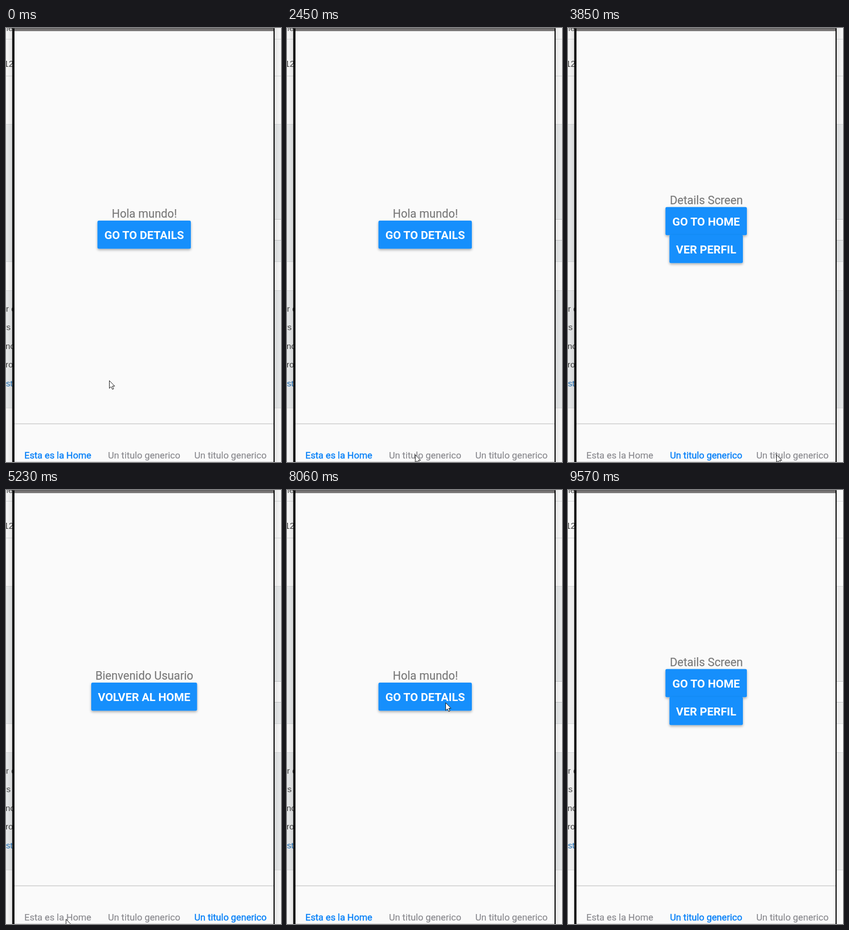
Animation, 552 px wide and 872 px high, one loop 9670 ms. Source, as an HTML page:

```html
<!DOCTYPE html>
<html lang="es">
<head>
<meta charset="utf-8">
<title>Tab navigation</title>
<style>
  html, body { margin: 0; width: 100%; height: 100%; overflow: hidden; background: #fafafa; }
  svg { display: block; width: 552px; height: 872px; }
  text { font-family: Roboto, sans-serif; }
  .page text { font: 17px "Liberation Sans", Arial, sans-serif; fill: #444; }
  .page .link { fill: #1d6fb8; }
  .app { filter: blur(.45px); }
  .app text { text-anchor: middle; }
  .label { font-size: 23px; fill: #7c7c7c; stroke: #7c7c7c; stroke-width: .25; }
  .button text { font-size: 22.7px; font-weight: 700; fill: #fff; }
  .tab { font-size: 18.6px; fill: #8a8a8f; stroke: #8a8a8f; stroke-width: .2; }
  .tab.active { fill: #0a82f8; stroke: #0a82f8; stroke-width: .5; }
</style>
</head>
<body>
<svg viewBox="0 0 552 872">
  <defs>
    <linearGradient id="shadeLeft"><stop offset="0" stop-opacity=".02"/><stop offset="1" stop-opacity=".1"/></linearGradient>
    <linearGradient id="shadeRight"><stop offset="0" stop-opacity=".1"/><stop offset="1" stop-opacity=".02"/></linearGradient>
    <filter id="drop" x="-10%" y="-20%" width="120%" height="150%">
      <feDropShadow dx="0" dy="2.5" stdDeviation="2.4" flood-opacity=".32"/>
    </filter>
  </defs>
  <g class="page">
    <rect width="552" height="872" fill="#fdfdfd"/>
    <g id="bands">
      <rect y="194" width="552" height="275"/>
      <rect y="528" width="552" height="235"/>
    </g>
    <path d="M0 22.5H552M0 96.5H552M0 193.5H552M0 469.5H552M0 527.5H552M0 763.5H552" stroke="#d9dbdc"/>
    <rect x="530" y="384.5" width="30" height="42" fill="#fdfdfd" stroke="#c4c6c8"/>
    <text x="-5" y="6">ne</text>
    <text x="-4" y="78">12</text>
    <text x="0" y="570">r c</text>
    <text x="-5" y="607">rs</text>
    <text x="-1" y="645">nc</text>
    <text x="-1" y="682">ro</text>
    <text x="0" y="719.5" class="link">st</text>
    <g id="shade">
      <rect width="13" height="872" fill="url(#shadeLeft)"/>
      <rect x="539" width="13" height="872" fill="url(#shadeRight)"/>
    </g>
  </g>
  <rect x="12.5" width="526.7" height="872" fill="#000"/>
  <rect x="17" width="520" height="872" fill="#fafafa"/>
  <rect x="13" width="526" height="1" fill="#555"/>
  <rect x="17" y="1" width="520" height="5" fill="#757272"/>
  <rect x="17" y="6" width="520" height="1" fill="#d5d5d5"/>
  <rect x="17" y="794.5" width="520" height="1.6" fill="#cdcdcd"/>
  <rect x="17" y="871" width="520" height="1" fill="#d0d0d0"/>
  <g class="app" id="screens"></g>
  <g class="app" id="tabs"></g>
  <path id="cursor" d="M.5 .5V16L4 12.7L6.6 18L9 17L6.6 11.6H11.2Z" fill="#fff" stroke="#111"/>
</svg>
<script>
const LOOP = 9670;
const POINTER_GONE = 9570;
const STEP = 136.6;
const CENTER = 277.3;
const $ = id => document.getElementById(id);

function add(parent, name, attrs, text = "") {
  const node = document.createElementNS("http://www.w3.org/2000/svg", name);
  for (const key in attrs) node.setAttribute(key, attrs[key]);
  node.textContent = text;
  return parent.appendChild(node);
}

function addButton(parent, text, top, width) {
  const group = add(parent, "g", { class: "button" });
  add(group, "rect", {
    x: CENTER - width / 2, y: top, width, height: 56.5, rx: 3,
    fill: "#178ffc", filter: "url(#drop)"
  });
  add(group, "text", { x: CENTER, y: top + 37.2 }, text);
}

function addScreen(label, baseline, buttons) {
  const group = add($("screens"), "g", {});
  add(group, "text", { class: "label", x: CENTER + .4, y: baseline }, label);
  buttons.forEach(([text, width], i) => addButton(group, text, baseline + 6 + i * 56, width));
  return group;
}

const screens = [
  addScreen("Hola mundo!", 381, [["GO TO DETAILS", 187.5]]),
  addScreen("Details Screen", 353.7, [["GO TO HOME", 163.5], ["VER PERFIL", 147.5]]),
  addScreen("Bienvenido Usuario", 381, [["VOLVER AL HOME", 212.5]])
];

const tabs = ["Esta es la Home", "Un titulo generico", "Un titulo generico"].map((text, i) =>
  add($("tabs"), "text", { class: "tab", x: 104 + i * 173.3, y: 865 }, text));

const visits = [
  { start: 0, screen: 0 },
  { start: 2600, screen: 1 },
  { start: 4530, screen: 2 },
  { start: 6580, screen: 0 },
  { start: 8210, screen: 1 }
];

// Each stroke bends from the previous end towards `via` and stops at `to`.
const origin = [207, 708];
const strokes = [
  { start: 120, steps: 1, via: origin, to: [200, 708] },
  { start: 510, steps: 8, via: [62, 850], to: [120, 853] },
  { start: 1610, steps: 4, via: [190, 868], to: [254, 856] },
  { start: 2450, steps: 1, via: [254, 856], to: [257, 857] },
  { start: 3030, steps: 7, via: [235, 836], to: [418, 857] },
  { start: 4810, steps: 4, via: [270, 860], to: [120, 862] },
  { start: 6860, steps: 7, via: [540, 430], to: [318, 427] },
  { start: 8620, steps: 4, via: [420, 700], to: [489, 849] }
];

const smooth = u => u * u * (3 - 2 * u);
const bend = (a, b, c, u) => (1 - u) ** 2 * a + 2 * u * (1 - u) * b + u * u * c;

function pointerAt(t) {
  let point = origin;
  for (const { start, steps, via, to } of strokes) {
    if (t < start) break;
    const taken = Math.min(steps, Math.floor((t - start) / STEP) + 1);
    const u = smooth(taken / steps);
    point = point.map((from, axis) => bend(from, via[axis], to[axis], u));
  }
  return point.map(Math.round);
}

function render(t) {
  const { screen } = visits.findLast(visit => visit.start <= t);
  screens.forEach((node, i) => node.setAttribute("visibility", i === screen ? "visible" : "hidden"));
  tabs.forEach((tab, i) => tab.classList.toggle("active", i === screen));

  const gone = t >= POINTER_GONE;
  $("cursor").setAttribute("transform", `translate(${pointerAt(t)})`);
  $("cursor").setAttribute("visibility", gone ? "hidden" : "visible");
  $("shade").setAttribute("opacity", gone ? .35 : 1);
  $("bands").setAttribute("fill", gone ? "#f1f1f1" : "#eceeef");
}

const begin = performance.now();
function tick() {
  render((performance.now() - begin) % LOOP);
  requestAnimationFrame(tick);
}
tick();
</script>
</body>
</html>
```
